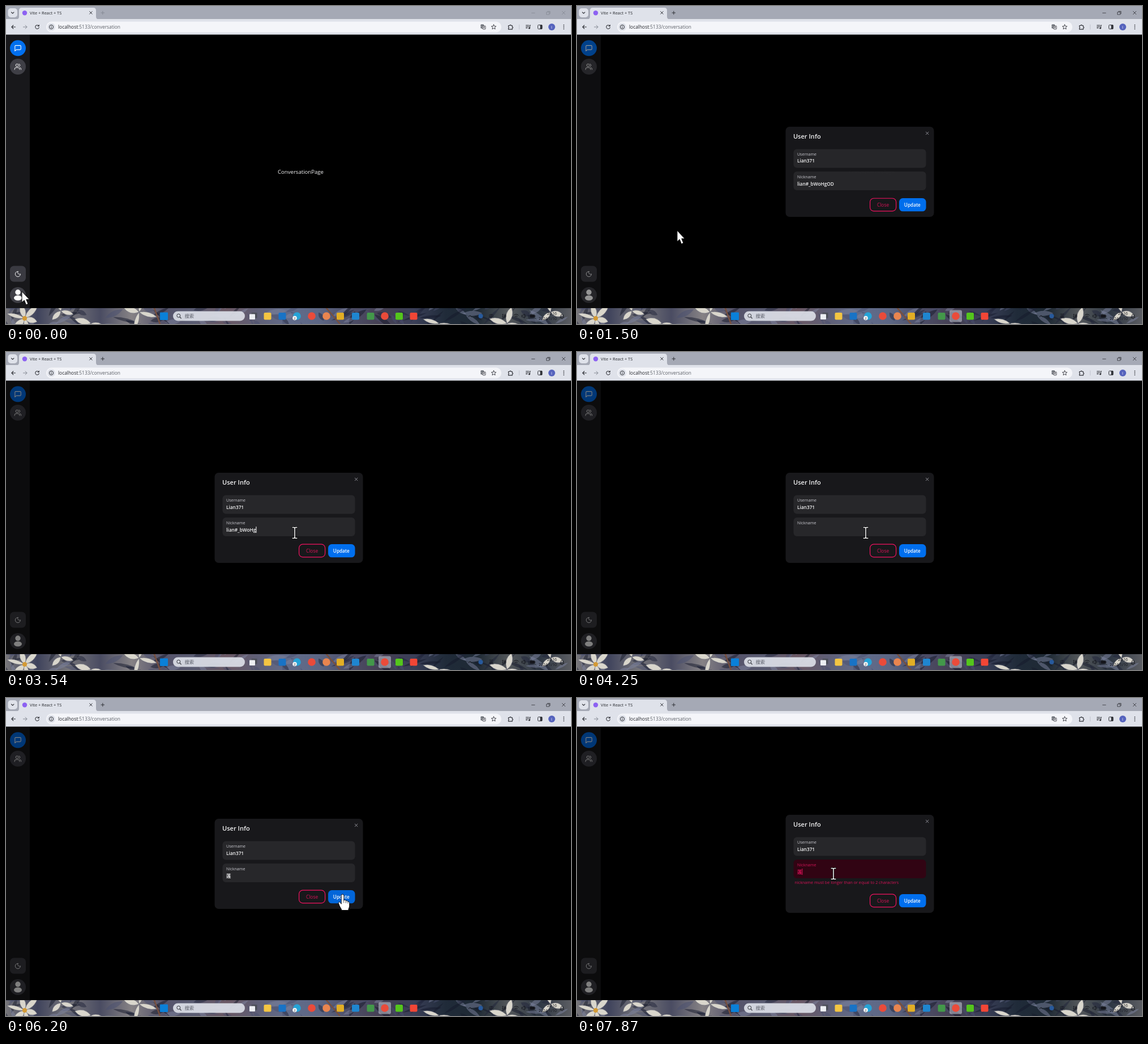
An HTML page for the animation above (8000 ms loop, 998 by 561 pixels).

```html
<!DOCTYPE html>
<html lang="en">
<head>
<meta charset="utf-8">
<title>User Info dialog</title>
<style>
html,body{margin:0;width:100%;height:100%;overflow:hidden;background:#000}
svg{display:block;width:998px;height:561px}
text{font-family:"Open Sans","Noto Sans CJK SC","Noto Sans CJK JP",sans-serif;white-space:pre}
.ln{fill:none;stroke-linecap:round;stroke-linejoin:round}
</style>
</head>
<body>
<svg id="stage" viewBox="0 0 998 561" xmlns="http://www.w3.org/2000/svg"></svg>
<script>
const LOOP = 8000;
const NICK = 'lian#_bWoHgOD', USER = 'Lian371', SAVED = 'lian#U8Qdtk5vm', CHAR = '莲';
const RED = '#f31260', BLUE = '#006fee', PANEL = '#18181b', FIELD = '#27272a', GREY = '#3f3f46';

// Markup helpers
const rect = (x, y, w, h, r, fill, more = '') =>
  `<rect x="${x}" y="${y}" width="${w}" height="${h}" rx="${r}" fill="${fill}" ${more}/>`;
const circle = (x, y, r, fill, more = '') => `<circle cx="${x}" cy="${y}" r="${r}" fill="${fill}" ${more}/>`;
const text = (x, y, size, fill, str, more = '') =>
  `<text x="${x}" y="${y}" font-size="${size}" fill="${fill}" ${more}>${str}</text>`;
const line = (d, color, w = 1, more = '') =>
  `<path class="ln" d="${d}" stroke="${color}" stroke-width="${w}" ${more}/>`;
const group = (id, inner, more = '') => `<g id="${id}" ${more}>${inner}</g>`;

function browser() {
  const ink = '#303238';
  return rect(0, 0, 998, 24, 0, '#a5a9b5') + rect(0, 23, 998, 27.5, 0, '#dfe2ea') +
    rect(3.5, 4, 16.5, 16, 5, '#dfe2ea') + line('M9.5 11l2.2 2.2 2.2-2.2', ink, 1.1) +
    `<path d="M18 23.5q5 0 5-5V8q0-5 5-5H154q5 0 5 5v10.500q0 5 5 5z" fill="#dfe2ea"/>` +
    circle(33, 12.3, 4.2, '#8d62f2') + text(42, 14.8, 7.4, '#26282d', 'Vite + React + TS') +
    line('M147.6 9.6l4.600 4.600m0-4.600l-4.600 4.600', ink, 1) +
    group('controls',
      line('M168 12h5.600M170.800 9.200v5.600', 'currentColor', 1) +
      line('M928.500 12.300h5.500M955 10.800h4.600v4.300h-4.600zM956.500 9.400h4.500v4.300M982.300 9.300l5.400 5.400m0-5.400l-5.400 5.400', 'currentColor', .8)) +
    line('M16.500 37h-6.500m2.900-3l-3 3 3 3M57.900 35.200a3.300 3.300 0 1 0 .4 2.700M58.300 33.300v2.200h-2.200', ink, 1.1) +
    line('M30.500 37h6.500m-2.900-3l3 3-3 3', '#858993', 1) +
    rect(71, 27.5, 804, 19, 9.5, '#f4f5f9') + circle(80, 37, 7, '#dfe2ea') +
    circle(80, 37, 3.6, 'none', `stroke="${ink}"`) + line('M80 36.800v1.800M80 35.200v.1', ink, 1) +
    text(92, 39.9, 8.4, '#24262b', 'localhost<tspan fill="#5c6068">:5133/conversation</tspan>') +
    rect(838.5, 32.5, 5.5, 7, 1, '#5d6169') + rect(842, 35, 5, 6, 1, '#f4f5f9', `stroke="${ink}" stroke-width=".8"`) +
    text(839.3, 38.3, 5, '#fff', 'G') + line('M843.300 37h2.400m-1.200-1v1q0 1.500-1.200 2.300m.5-1.500l1.800 1.500', ink, .6) +
    line('M861.500 32.800l1.200 2.800 3 .2-2.300 2 .7 3-2.600-1.600-2.600 1.600.7-3-2.300-2 3-.2z', ink, .9) +
    line('M887.500 34.500h2.300a1.200 1.200 0 0 1 2.400 0h2v2.300a1.200 1.200 0 0 1 0 2.400v2h-6.700v-2.200a1.200 1.200 0 0 0 0-2.200z', ink, 1.2) +
    line('M906.500 33v8', '#b9bdc7', .8) +
    line('M918.500 34h5M918.500 36.300h5M918.500 38.600h2.500M925.300 39v-5h1.200', ink, 1.1) + circle(924.3, 39.2, 1.4, ink) +
    rect(939.5, 33.5, 7.5, 7, 1, 'none', `stroke="${ink}"`) + rect(943.5, 33.5, 3.5, 7, 0, ink) +
    circle(964, 37, 6, '#5563bd') + text(963, 39.5, 7, '#fff', 'i') +
    [33.7, 37, 40.3].map(y => circle(985.3, y, .9, ink)).join('');
}

function sidebar() {
  return rect(0, 50, 998, 483, 0, '#000') + rect(0, 50, 42, 483, 0, PANEL) +
    text(480, 295.8, 9.6, '#f4f4f5', 'ConversationPage') +
    circle(21, 74.3, 14, BLUE) + line('M15.800 79.300v-8.200q0-1.500 1.500-1.500h7.500q1.500 0 1.500 1.500v4.500q0 1.500-1.500 1.500h-6.600z', '#fff', 1.1) +
    circle(21, 107, 14, GREY) +
    line('M15.200 112.200v-1q0-2.500 2.500-2.500h3.700q2.500 0 2.500 2.500v1M26.600 112.200v-1q0-2-1.900-2.500M22.900 102.300a2.300 2.300 0 0 1 0 4.500', '#fff', 1) +
    circle(19.5, 104.5, 2.3, 'none', 'stroke="#fff"') +
    rect(7, 458.5, 28, 28, 7, '#3a3a41') +
    line('M21 468.300a3.300 3.300 0 0 0 4.500 4.500a4.600 4.600 0 1 1-4.500-4.500z', '#f4f4f5', 1) +
    circle(21, 510, 14, GREY) + circle(21, 505, 4.7, '#fff') + `<ellipse cx="21" cy="515" rx="7" ry="4.5" fill="#fff"/>`;
}

function menu() {
  const ink = '#e4e4e7', label = (y, s) => text(32, y, 8.2, ink, s);
  return rect(7, 390.5, 113.5, 102.5, 7, PANEL) + rect(12, 424, 104, 18, 4, FIELD, 'id="rowBg"') +
    text(16, 407, 8.1, '#8b8b92', NICK) +
    line('M12 418h104M12 465h104', '#38383d', .8) +
    circle(22, 430.7, 2.3, 'none', `stroke="${ink}"`) + line('M18 437.500q0-3.500 4-3.500t4 3.500', ink, 1) +
    line('M24.500 447h-6.500v8.500h8v-4M20.500 453l.4-1.700 4.300-4.300 1.300 1.300-4.300 4.300z', ink, .9) +
    line('M20.500 476h-2.500v7.500h2.500M21 479.800h5.500m-2-2l2 2-2 2', ink, 1) +
    label(435.8, 'User Info') + label(453.9, 'Change Password') + label(482.5, 'Log Out');
}

function modal() {
  const bold = 'font-weight="600"';
  return rect(368.5, 213, 262, 159, 7, PANEL, 'id="card"') +
    group('upper',
      text(382, 234, 11.05, '#f4f4f5', 'User Info', bold) +
      line('M616.300 222.200l4.600 4.600m0-4.600l-4.600 4.600', '#a1a1aa', .9) +
      rect(382.5, 252.5, 234, 33, 6, FIELD) + text(389, 264, 7.05, '#c9c9cf', 'Username') +
      text(389, 276.5, 8.3, '#f4f4f5', USER, bold) +
      rect(382.5, 292, 234, 33, 6, FIELD, 'id="nickBg"') + text(389, 303.8, 7.2, '#c9c9cf', 'Nickname', 'id="nickLabel"') +
      text(389, 316.5, 8.3, '#f4f4f5', '', 'id="nick" ' + bold) +
      rect(389, 318, 0, .8, 0, '#eee', 'id="under"') + rect(0, 308, 1, 11, 0, '#fff', 'id="caret"') +
      text(384.5, 334.5, 7.2, RED, 'nickname must be longer than or equal to 2 characters', 'id="error" opacity=".85"')) +
    group('lower',
      rect(517.6, 339.2, 46, 22.6, 6.5, PANEL, `stroke="${RED}" stroke-width="1.2"`) +
      text(540.5, 353.8, 8.4, RED, 'Close', 'text-anchor="middle" opacity=".88"') +
      group('update', rect(569, 339, 47.5, 23.3, 6.5, BLUE, 'id="updateBg"') +
        text(592.3, 353.8, 8.2, '#fff', 'Update', bold + ' text-anchor="middle"')));
}

function saved() {
  return `<path d="M450.500 324h5.500l5-4.500 5 4.500h70q1.500 0 1.500 1.500v22q0 1.500-1.500 1.500h-86q-1.500 0-1.500-1.500v-22q0-1.500 1.500-1.500z" fill="#f3f3f4"/>` +
    text(455, 339.3, 8, '#1c1c1e', SAVED);
}

function candidates() {
  return rect(405, 308.5, 323.5, 25, 4, '#f4f5f8', 'stroke="#c6c8ce" stroke-width=".6"') +
    rect(409, 311.5, 36, 19, 3, '#d9dde6', 'id="pick"') +
    [...'连脸练恋莲链联'].map((c, i) =>
      text(415 + i * 42, 324.3, 8.3, '#222', `<tspan fill="#777">${i + 1}</tspan>  ${c}`)).join('');
}

// Blurry floral strip behind the taskbar: base tones, muted leaves, a few pale petals
function wallpaper() {
  let seed = 11;
  const rnd = (a, b) => {
    seed = (seed * 16807) % 2147483647;
    return a + (b - a) * seed / 2147483647;
  };
  const petal = (x, y, len, w, ang, fill, more = '') =>
    `<path d="M0 0Q${len / 2} ${-w} ${len} 0Q${len / 2} ${w} 0 0z" transform="translate(${x} ${y}) rotate(${ang})" fill="${fill}" ${more}/>`;
  let s = rect(0, 533, 998, 28, 0, 'url(#tones)');
  for (let i = 0; i < 110; i++) {
    const tone = ['#20243a', '#7d83a0', '#4a5070', '#15192a'][i % 4];
    s += petal(rnd(-10, 1000).toFixed(1), rnd(533, 563).toFixed(1), rnd(16, 46), rnd(3, 9), rnd(-70, 70), tone, 'opacity=".5"');
  }
  for (const [x, y, n] of [[33, 551, 6], [97, 538, 3], [150, 560, 2], [235, 540, 4], [765, 560, 2], [885, 560, 4], [962, 540, 3]]) {
    for (let k = 0; k < n; k++) s += petal(x, y, rnd(20, 34), rnd(7, 12), k * 360 / n + 15, '#d9d6cc', 'stroke="#55566a" stroke-width=".5"');
  }
  return s + circle(33, 551, 4, '#d39a35') + line('M566 533l24 28M262 533l10 28', '#77503f', 2.5);
}

function taskbar() {
  const ink = '#14151b';
  const box = (x, c) => rect(x - 6.5, 541, 13, 12.5, 2, c), dot = (x, c) => circle(x, 547, 6.8, c);
  return '<g clip-path="url(#bar)">' + wallpaper() +
    rect(658, 536.5, 22, 21, 3, '#d8dbe6', 'id="active" opacity=".5"') +
    rect(272, 540.5, 14, 13.5, 1, '#0a80d8') + rect(295, 538.5, 127, 17, 8.5, '#d9dce5', 'opacity=".94"') +
    circle(304.8, 546.3, 3, 'none', 'stroke="#33363d"') + line('M307 548.600l2.300 2.400', '#33363d', 1.1) +
    text(315.5, 550.2, 8.3, '#565a64', '搜索') +
    rect(433.5, 541, 10, 9.5, 1, '#4b4e58') + rect(430, 543.5, 10, 9.5, 1, '#eceef2') +
    box(462, '#f4c542') + box(488, '#1873c6') + dot(514, '#26a3d6') + circle(510, 550.5, 3.8, '#f2f4f7') +
    text(508.3, 553, 6, '#333', '2') + dot(540, '#ea4b3a') + dot(566, '#e9854f') + box(590.5, '#e2ae25') +
    box(617.5, '#1f86d0') + box(644, '#43984a') + dot(669, '#ea4b3a') + box(694.5, '#54c51c') + box(720, '#f24636') +
    line('M817 548.500l2.700-2.700 2.700 2.700', ink, 1) + circle(838.5, 547, 4, '#285a9c') +
    text(857, 550.2, 8.5, ink, '中', 'id="ime" text-anchor="middle"') + text(880, 550.2, 8.5, ink, '拼', 'text-anchor="middle"') +
    line('M897 545.500q4-3.500 8 0M898.800 547.700q2.200-2 4.400 0M901 550v.1', ink, 1) +
    line('M911.500 545.500h1.800l2.400-2v7l-2.400-2h-1.800zM917.500 545q1.500 2 0 4', ink, .9) +
    rect(925.5, 544.5, 8.5, 5, 1, ink) + rect(934.3, 546, 1, 2, 0, ink) +
    text(973, 544.5, 6.8, ink, '20:16', 'text-anchor="end"') + text(973, 553.7, 6.8, ink, '2024/1/10', 'text-anchor="end"') +
    line('M979 550h6.500q-1-1-1-4 0-2-2.200-2t-2.200 2q0 3-1 4M981.500 551.700h1.500', ink, .9) + '</g>';
}

function cursors() {
  const shape = (id, d, extra = '') =>
    group(id, `<path d="${d}" fill="#fff" stroke="#000" stroke-width=".9" stroke-linejoin="round"/>` + extra);
  const beam = 'M-3.800-9.500h2.300q1.500 0 1.500 1.500V8q0 1.500 1.500 1.500h2.300M3.800-9.500H1.500Q0-9.500 0-8V8q0 1.500-1.500 1.500h-2.300';
  return shape('arrow', 'M0 0V19.500L4.300 15.600 7.400 23.600 11 22.100 7.800 14.300H13.300Z') +
    shape('hand', 'M-2.300 2A2.300 2.300 0 0 1 2.300 2V10.500C2.600 9.300 5.800 9.500 6 11.600 6.600 10.600 9.200 11 9.400 13 10 12.200 12.200 12.800 12.200 15V20C12.200 23.500 10.300 24.500 10.300 28H-1.700C-1.700 25.500-4 23.500-5.300 20.500L-7.200 15.600C-7.800 13.600-5.300 12.500-4 14.300L-2.300 16.800Z',
      line('M2.300 10.500v4M6 11.800v3.200M9.400 13.200v2.500', '#000', .7)) +
    group('beam', line(beam, '#000', 3) + line(beam, '#fff', 1.5));
}

const TONES = ['#77767a', '#3f435c', '#77767a', '#4a4c62', '#868285', '#55536a', '#5a5c72', '#6a5763', '#5f5f76',
  '#626c8a', '#5c6684', '#4c4d66', '#453f52', '#3a3f58', '#202b39', '#1e2934', '#53575a', '#2f3844', '#5b5d62'];
const stops = TONES.map((c, i) => `<stop offset="${i / (TONES.length - 1)}" stop-color="${c}"/>`).join('');

document.getElementById('stage').innerHTML =
  `<defs><clipPath id="bar"><rect y="533" width="998" height="28"/></clipPath><linearGradient id="tones">${stops}</linearGradient></defs>` +
  sidebar() + group('menu', menu()) +
  rect(0, 50, 998, 483, 0, '#000', 'id="shade"') + group('modal', modal()) +
  group('saved', saved()) + group('panel', candidates()) + browser() + taskbar() + group('cursor', cursors());

// Animation
const $ = id => document.getElementById(id);
const set = (id, attrs) => { for (const k in attrs) $(id).setAttribute(k, attrs[k]); };
const show = (id, on) => set(id, { visibility: on ? 'visible' : 'hidden' });
const ramp = (t, a, b) => Math.min(1, Math.max(0, (t - a) / (b - a)));
const ease = p => p * p * (3 - 2 * p);
const out = p => 1 - (1 - p) ** 3;
const within = (t, ...spans) => spans.some(([a, b]) => t >= a && t < b);
const mix = (a, b, p) => 'rgb(' + a.map((v, i) => Math.round(v + (b[i] - v) * p)) + ')';
const zoom = (x, y, k) => `translate(${x} ${y}) scale(${k}) translate(${-x} ${-y})`;

const PATH = [[40, 23, 507], [560, 23, 507], [1000, 43.5, 426.5], [1240, 43.5, 426.5], [1980, 511, 320], [2200, 511, 320],
  [2300, 510, 319], [5830, 510, 319], [6120, 594.5, 346.5], [6420, 594.5, 346.5], [6690, 453, 310]];
const ERROR_AT = 6420;

function pointer(t) {
  if (t < 40) return [28, 503.5];
  const i = PATH.findIndex(k => k[0] > t);
  if (i < 0) return PATH[PATH.length - 1].slice(1);
  const a = PATH[i - 1], b = PATH[i], p = ease(ramp(t, a[0], b[0]));
  return [a[1] + (b[1] - a[1]) * p, a[2] + (b[2] - a[2]) * p];
}

function nickname(t) {
  if (t < 3000) return NICK;
  if (t < 3500) return NICK.slice(0, 12);
  if (t < 4410) return NICK.slice(0, Math.max(0, 11 - Math.floor((t - 3500) / 42)));
  if (t < 5410) return 'lian'.slice(0, 1 + Math.min(3, Math.floor((t - 4410) / 125)));
  return CHAR;
}

function draw(t) {
  const [x, y] = pointer(t), bad = t >= ERROR_AT, shift = bad ? 7 : 0, focused = t >= 370;

  set('controls', { color: focused ? '#303238' : '#858994' });
  show('active', focused);
  $('ime').textContent = within(t, [370, 4250]) ? '英' : '中';

  const open = out(ramp(t, 370, 560)), shut = ramp(t, 1230, 1380);
  set('menu', { opacity: open * (1 - shut), transform: zoom(21, 493, .9 + .1 * open) });
  const row = t > 380 && t < 1400 ? [424, 442, 471].find(r => y >= r && y < r + 18) : 0;
  show('rowBg', row);
  if (row) set('rowBg', { y: row });

  set('shade', { opacity: .5 * ramp(t, 1200, 1560) });
  set('modal', {
    opacity: ease(ramp(t, 1170, 1520)),
    transform: zoom(499.5, 292.5, 1.04 - .04 * out(ramp(t, 1190, 1600)))
  });
  set('card', { y: 213 - shift, height: 159 + 2 * shift });
  set('upper', { transform: `translate(0 ${-shift})` });
  set('lower', { transform: `translate(0 ${shift})` });

  const hover = ramp(t, 1960, 2080) * (1 - ramp(t, 2220, 2400)), red = ramp(t, ERROR_AT, ERROR_AT + 150);
  set('nickBg', { fill: bad ? mix([39, 39, 42], [49, 4, 19], red) : mix([39, 39, 42], [60, 59, 65], hover) });
  set('nickLabel', { fill: bad ? '#cf1355' : '#c9c9cf' });
  set('nick', { fill: bad ? '#e0125a' : '#f4f4f5' });
  show('error', bad);

  const value = nickname(t);
  if ($('nick').textContent !== value) $('nick').textContent = value;
  const width = value ? $('nick').getComputedTextLength() : 0, typing = within(t, [4410, 5410]);
  set('under', { width: typing ? width : 0 });
  set('caret', { x: 389 + width, fill: bad ? '#e0125a' : '#fff' });
  show('caret', within(t, [2290, 2790], [3330, 4100], [4410, 6000], [ERROR_AT, 7330], [7870, 8000]));

  const popup = ramp(t, 3790, 3890) * (1 - ramp(t, 3960, 4080)) + ramp(t, 4410, 4560) * (1 - ramp(t, 5420, 5660));
  set('saved', { opacity: popup });
  show('panel', typing);
  set('pick', { x: t < 5000 ? 409 : 577 });

  set('update', { transform: zoom(592.5, 350.5, within(t, [6240, 6340]) ? .97 : 1) });
  set('updateBg', { opacity: 1 - .1 * ramp(t, 6050, 6160) * (1 - ramp(t, 6500, 6690)) });

  const inX = (a, b) => x >= a && x <= b, inY = (a, b) => y >= a && y <= b;
  const onButton = t > 1700 && inX(517, 616) && !inX(564, 569) && inY(339 + shift, 362 + shift);
  const onField = t > 1700 && inX(382, 616) && (inY(253 - shift, 285 - shift) || inY(292 - shift, 325 - shift));
  const onAvatar = t >= 40 && t < 1240 && Math.hypot(x - 21, y - 510) < 14;
  const kind = onButton || onAvatar || row ? 'hand' : onField ? 'beam' : 'arrow';
  for (const k of ['arrow', 'hand', 'beam']) show(k, k === kind);
  set('cursor', { transform: `translate(${x} ${y})` });
}

const start = performance.now();
function tick() {
  draw((performance.now() - start) % LOOP);
  requestAnimationFrame(tick);
}
tick();
</script>
</body>
</html>
```
